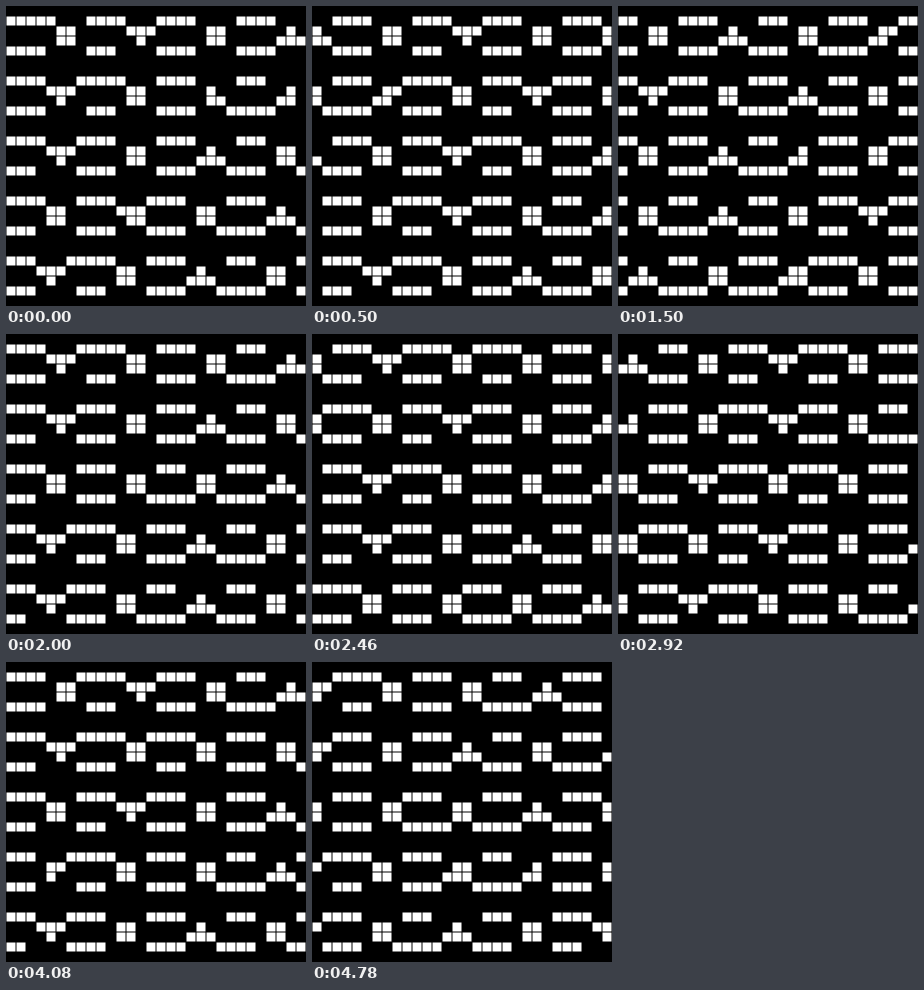
Write an HTML page with a canvas that moves like this. It is 300 by 300 pixels and loops after 4800 ms.

```html
<!DOCTYPE html>
<html lang="en">
<head>
<meta charset="utf-8">
<title>Braids</title>
<style>
  html, body { margin: 0; width: 100%; height: 100%; overflow: hidden; background: #000; }
  canvas { display: block; width: 300px; height: 300px; }
</style>
</head>
<body>
<canvas id="stage" width="300" height="300"></canvas>
<script>
const ctx = document.getElementById('stage').getContext('2d');
const LOOP = 4800, STEP = 20;
const CELL = 10, COUNT = 30, BAND = 6;
const PERIOD = 7.515, SPEED = 3.62, START = 5.5, SLANT = 0.055;
const RIPPLE = { length: 38, speed: 94.2, start: 18, slant: 0.33, size: 0.32 };

// Signed distance from x to the nearest multiple of PERIOD.
const wrap = x => x - PERIOD * Math.round(x / PERIOD);

function isLit(col, row, t) {
  const line = row % BAND;
  if (line === 0 || line === BAND - 1) return false;

  const outer = line === 1 || line === 4;
  const knot = START + SPEED * t - SLANT * (row - 2.5);
  const dist = Math.abs(wrap(col - knot - (outer ? PERIOD / 2 : 0)));

  // A fast ripple thickens the upper strand while it thins the lower one.
  const zero = RIPPLE.start + RIPPLE.speed * t - RIPPLE.slant * (row - line);
  const wave = Math.sin(2 * Math.PI * (zero - col) / RIPPLE.length);
  const swell = RIPPLE.size * wave * (line < 3 ? 1 : -1);

  return dist < (outer ? 2 : 1) + swell;
}

function draw(ms) {
  const t = Math.floor((ms % LOOP) / STEP) * STEP / 1000;
  ctx.fillStyle = '#000';
  ctx.fillRect(0, 0, 300, 300);
  ctx.fillStyle = '#fff';
  for (let row = 0; row < COUNT; row++) {
    for (let col = 0; col < COUNT; col++) {
      if (isLit(col, row, t)) {
        ctx.fillRect(col * CELL + 0.5, row * CELL + 0.5, CELL - 1, CELL - 1);
      }
    }
  }
}

const begin = performance.now();
function tick() {
  draw(performance.now() - begin);
  requestAnimationFrame(tick);
}
tick();
</script>
</body>
</html>
```
